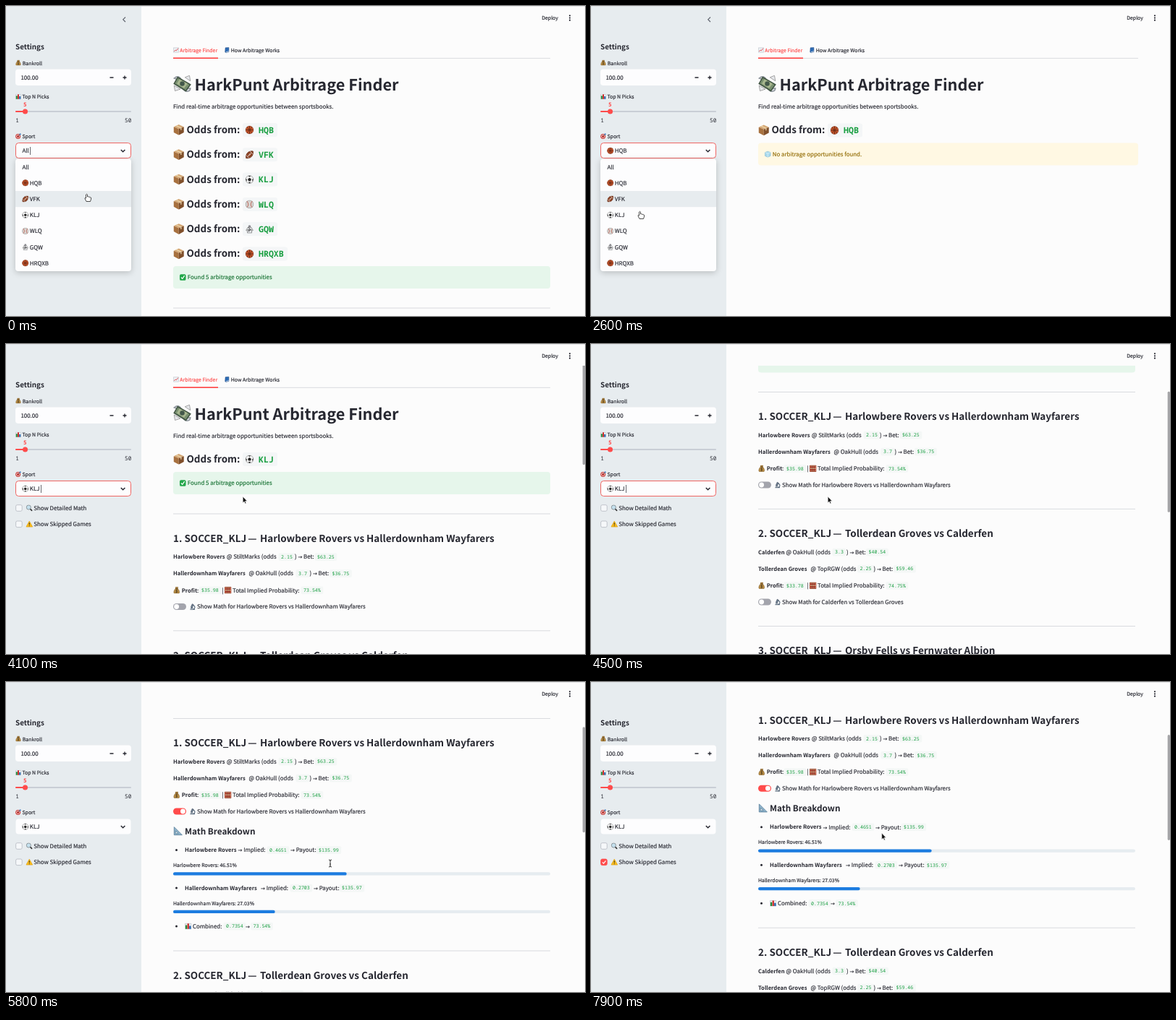
An HTML page that plays this animation: 800 by 429 pixels, repeating every 8 s.

```html
<!DOCTYPE html>
<html lang="en">
<head>
<meta charset="utf-8">
<title>Arbitrage Finder</title>
<style>
html, body { margin: 0; width: 100%; height: 100%; overflow: hidden; background: #fcfcfc }
svg { display: block }
text { font-family: "Noto Sans CJK JP", "Noto Sans CJK SC", "Noto Sans CJK", "Open Sans", sans-serif;
  fill: currentColor; stroke: currentColor; stroke-width: .16; white-space: pre; text-rendering: geometricPrecision }
.bold { font-weight: 700; stroke: none }
.arrow { font-family: "DejaVu Sans", sans-serif; font-size: 7px }
.mono { font-family: "Noto Sans Mono", "DejaVu Sans Mono", monospace; stroke: none }
</style>
</head>
<body>
<svg id="stage" width="800" height="429" viewBox="0 0 800 429">
  <defs id="defs"></defs>
  <rect width="800" height="429" fill="#fcfcfc"/>
  <g id="main"></g>
  <g id="top"></g>
  <g id="side"></g>
  <g id="cursor"></g>
</svg>
<script>
const $ = id => document.getElementById(id);
const RED = '#ff4b4b', GREEN = '#1a9f42', INK = '#262730', BODY = 8.82, SMALL = 7.72, HEAD = 15.06;
const TEAMS = ['Harlowbere Rovers', 'Hallerdownham Wayfarers'];
const SPORTS = [['All'], ['HQB', 'basket'], ['VFK', 'rugby'], ['KLJ', 'soccer'], ['WLQ', 'base'], ['GQW', 'gi'], ['HRQXB', 'basket']];

// Icons on a 20 x 20 grid
const p = (d, fill, stroke = 'none', w = 1.2) => `<path d="${d}" fill="${fill}" stroke="${stroke}" stroke-width="${w}"/>`;
const disc = (x, y, r, fill, stroke = 'none') => `<circle cx="${x}" cy="${y}" r="${r}" fill="${fill}" stroke="${stroke}"/>`;
const sheet = p('M1 2H19V18H1Z', '#eef1f3', '#a9b4bf');
const icons = {
  bag: p('M7 1H14L12.500 5C18 8 20 19 16 19H4C0 19 2 8 7.500 5Z', '#b98d45', '#7d5b26') + p('M6 5H14', 'none', '#6b4a1c', 2) +
    p('M13 9C8 7 6 12 10 12.500S12 17 7 15.500M10 7V18', 'none', '#4d3b1b', 1.500),
  bars: sheet + p('M2 7H7V18H2Z', '#23893a') + p('M7.500 2H12.500V18H7.500Z', '#cf302e') + p('M13 9H18V18H13Z', '#2565b0'),
  target: disc(9, 11, 8.5, '#c9302c') + disc(9, 11, 6, '#eee') + disc(9, 11, 4, '#c9302c') + p('M9 11 16 4', 'none', '#333', 1.500) + p('M14 6V2L18 0V3H20L18 6Z', '#3d7fc4'),
  basket: disc(10, 10, 9, '#c9562b', '#7d3018') + p('M1 10H19M10 1V19M4 3C9 7 9 13 4 17M16 3C11 7 11 13 16 17', 'none', '#4c1f12'),
  rugby: p('M2 18C0 8 8 0 18 2C20 12 12 20 2 18Z', '#8f4527', '#5f2b18') + p('M6 14 14 6M8 10 10 12M10 8 12 10', 'none', '#fff', 1.300) + p('M2 11 9 18M11 2 18 9', 'none', '#eee'),
  soccer: disc(10, 10, 9, '#f4f4f4', '#777') + p('M10 6 14 9 12.500 13.500H7.500L6 9ZM7 1.500H13L10 4ZM1 8 4 10 3 15ZM19 8 16 10 17 15ZM7 16H13L10 19Z', '#222'),
  base: disc(10, 10, 9, '#d9d5d1', '#858585') + p('M4 3C8 8 8 13 4 17M16 3C12 8 12 13 16 17', 'none', '#b5483c', 1.500),
  gi: disc(10, 4, 3, '#8b8b91') + p('M6 6H14L18 13 15 14V19H5V14L2 13Z', '#e3e5e8', '#777') + p('M5 12H15M10 12 8 16M7 6 12 11', 'none', '#333', 1.600),
  rise: sheet + p('M3 15 8 10 11 12 17 4', 'none', '#dd2f38', 2),
  book: p('M4 2 16 1V16L6 19 3 17Z', '#2d6cb5', '#1b4379') + p('M6 17 16 14', 'none', '#f2f2f2', 2),
  cash: p('M1 4C6 0 9 4 9 7ZM11 16C14 20 19 19 19 15Z', '#d9dde2', '#8b9299') + p('M5 3 19 11 14 18 1 10Z', '#799070', '#3f5341') +
    p('M7 5 16 10 12 15 4 10Z', '#a8b78f') + disc(10, 10, 2.6, '#43584a') + p('M13 3 18 1 19 7ZM1 12 2 18 8 16Z', '#e7e9ec', '#999', .700),
  box: p('M1 5 10 1 19 5 10 9Z', '#d5a875') + p('M1 5 10 9V20L1 15Z', '#a8713f') + p('M19 5 10 9V20L19 15Z', '#80502b') + p('M5 3 14 7V11', 'none', '#ecd6ad', 1.600),
  check: '<rect x="1" y="1" width="18" height="18" rx="4" fill="#22a74a"/>' + p('M5 10 9 14 15 5', 'none', '#fff', 2.500),
  ice: p('M2 5 10 2 18 5V15L10 19 2 15Z', '#a9d9ec', '#79b4d0') + p('M2 5 10 8 18 5M10 8V19', 'none', '#ecfaff'),
  lens: p('M11 11 18 18', 'none', '#333', 3.500) + disc(8, 8, 6.5, '#c4e0ee', '#444'),
  warn: p('M10 1 19.500 18H.500Z', '#fbbd1c', '#d79b0d') + p('M10 6V12M10 14V16', 'none', '#222', 2),
  scope: p('M9 2 13 4 9 13 5 11Z', '#6d7d90', '#39485a') + p('M12 6C19 9 18 16 12 17M3 18H17M4 14H11', 'none', '#43566b', 2.200),
  abacus: p('M1 1H19V19H1Z', '#dda983', '#963c28', 2) + p('M2 6H18M2 14H18', 'none', '#b5382e', 4) + p('M7 2V18M13 2V18', 'none', '#5a2e20', 1.500),
  ruler: p('M2 1V18H19Z', '#8fb3cb', '#4f7893') + p('M5 9V15H11Z', '#fcfcfc', '#4f7893')
};
$('defs').innerHTML = Object.entries(icons).map(([id, body]) => `<symbol id="${id}" viewBox="0 0 20 20">${body}</symbol>`).join('');

// Drawing helpers; y is the middle of the capitals
const icon = (x, y, id, s = 9.5) => `<use href="#${id}" x="${x}" y="${y - s / 2}" width="${s}" height="${s}"/>`;
const rect = (x, y, w, h, fill, r = 0, more = '') => `<rect x="${x}" y="${y}" width="${w}" height="${h}" rx="${r}" fill="${fill}" ${more}/>`;
const text = (x, y, str, size = BODY, color = INK, bold = false) =>
  `<text x="${x}" y="${y + size * .33}" font-size="${size * .895}" color="${color}" class="${bold ? 'bold' : ''}">${str.replace('→', '<tspan class="arrow">→</tspan>')}</text>`;
const mono = (x, y, str, size = 6.61, color = GREEN, weight = 400) =>
  `<text class="mono" x="${x}" y="${y + size * .35}" font-size="${size}" font-weight="${weight}" color="${color}">${str}</text>`;
const code = (x, y, str) => rect(x - 3.5, y - 5.2, str.length * 3.97 + 7, 10.6, '#f4f7f6', 2) + mono(x, y, str);
const head = (x, y, str, size = HEAD) => text(x, y, str, size, INK, true);
const rule = (y, right = 752) => rect(231, y - .5, right - 231, 1, '#d9dbdf');

// Pairs of x and text: * bold, ` code, # icon
function row(y, ...parts) {
  let out = '';
  for (let i = 0; i < parts.length; i += 2) {
    const x = parts[i], s = parts[i + 1], rest = s.slice(1);
    out += s[0] == '*' ? text(x, y, rest, BODY * .965, INK, true) : s[0] == '`' ? code(x, y, rest)
      : s[0] == '#' ? icon(x, y, rest) : text(x, y, s);
  }
  return out;
}

const odds = (y, [name, id]) => icon(231, y, 'box', 15.5) + head(249.5, y, 'Odds from:') +
  rect(327, y - 9, 27 + name.length * 7, 19, '#f4f6f7', 3) + icon(330.5, y + .5, id, 12) + mono(349, y + .8, name, 11.6, GREEN, 600);

const notice = (y, id, str, bg, fg, right) => rect(231, y, right - 231, 31, bg, 4) + icon(239.5, y + 15.5, id, 9.5) + text(250.8, y + 15.5, str, BODY, fg);
const found = y => notice(y, 'check', 'Found 5 arbitrage opportunities', '#e6f6eb', '#177233', 752);

const banner = right => icon(231, 61, 'rise', 8) + text(240.3, 61, 'Arbitrage Finder', SMALL, RED) +
  icon(301.5, 61, 'book', 8) + text(310.8, 61, 'How Arbitrage Works', SMALL) +
  rule(72.3, right) + rect(231, 71.3, 62, 1.7, RED) +
  icon(231, 107.5, 'cash', 25) + head(260.5, 108.5, 'HarkPunt Arbitrage Finder', 24.25) +
  text(231, 139, 'Find real-time arbitrage opportunities between sportsbooks.');

const title = (y, n, match) => head(231, y, n + '. SOCCER_KLJ') + head(334.3, y, '—') + head(351, y, match);
const profit = (y, gain, total) => row(y, 231, '#bag', 242.8, '*Profit', 264, ':', 270, '`' + gain, 298.5, '|', 302, '#abacus',
  313, 'Total Implied Probability:', 411, '`' + total);
const toggle = (y, on, match) => rect(231, y - 4.5, 18, 9, on ? RED : '#a3a4ac', 4.5) + disc(on ? 244.4 : 235.6, y, 3.4, '#fff') +
  icon(253, y, 'scope') + text(264, y, 'Show Math for ' + match);
const bar = (y, share) => rect(231, y - 2.2, 521, 4.4, '#e6ecf0', 2.2) + rect(231, y - 2.2, 521 * share, 4.4, '#1c7ce0', 2.2);

const math = y => icon(231, y + 122, 'ruler', 13) + head(247, y + 122, 'Math Breakdown', 13.1) +
  [148, 200.5, 253.5].map(d => disc(235.5, y + d, 1.5, INK)).join('') +
  row(y + 148, 247, '*' + TEAMS[0], 320.5, '→ Implied:', 364, '`0.4651', 393, '→ Payout:', 432, '`$135.99') +
  text(231, y + 169, TEAMS[0] + ': 46.51%', SMALL) + bar(y + 180.9, .46) +
  row(y + 200.5, 247, '*' + TEAMS[1], 352, '→ Implied:', 396, '`0.2703', 425, '→ Payout:', 464, '`$135.97') +
  text(231, y + 222, TEAMS[1] + ': 27.03%', SMALL) + bar(y + 233.4, .27) +
  row(y + 253.5, 247, '#bars', 258, 'Combined:', 304, '`0.7354', 331, '→', 341.5, '`73.54%');

function results(on, open) {
  const y = 281, y2 = y + (open ? 321.7 : 162), y3 = y2 + 161.5, match = TEAMS.join(' vs ');
  return banner(752) + odds(171, SPORTS[3]) + found(189) + rule(247) +
    title(y, 1, match) +
    row(y + 25.5, 231, '*' + TEAMS[0], 305, '@ StiltMarks (odds', 380, '`2.15', 399, ') → Bet:', 430, '`$63.25') +
    row(y + 48.5, 231, '*' + TEAMS[1], 335.5, '@ OakHull (odds', 404, '`3.7', 419.5, ') → Bet:', 450.5, '`$36.75') +
    profit(y + 71.8, '$35.98', '73.54%') + toggle(y + 94.5, on, match) + (open ? math(y) : '') + rule(y2 - 34.2) +
    title(y2, 2, 'Tollerdean Groves vs Calderfen') +
    row(y2 + 25.5, 231, '*Calderfen', 269.5, '@ OakHull (odds', 337, '`3.3', 353, ') → Bet:', 383.5, '`$40.54') +
    row(y2 + 48.5, 231, '*Tollerdean Groves', 303.5, '@ TopRGW (odds', 371.5, '`2.25', 390.5, ') → Bet:', 421.5, '`$59.46') +
    profit(y2 + 71.8, '$33.78', '74.75%') + toggle(y2 + 94.5, false, 'Calderfen vs Tollerdean Groves') + rule(y2 + 128) +
    title(y3, 3, 'Orsby Fells vs Fernwater Albion');
}

const pages = {
  all: banner(752) + SPORTS.slice(1).map((s, i) => odds(171 + i * 34.3, s)).join('') + found(360) + rule(418),
  one: banner(756) + odds(171.5, SPORTS[1]) + notice(189.5, 'ice', 'No arbitrage opportunities found.', '#fff8e3', '#926c05', 756),
  off: results(false, false), on: results(true, false), open: results(true, true)
};

const checkbox = (y, on, id, label) => rect(13.6, y - 4.3, 8.6, 8.6, on ? RED : '#f5f7f9', 2, `stroke="${on ? RED : '#b4b8c0'}" stroke-width=".8"`) +
  (on ? p(`M15.700 ${y}l1.700 1.800 3-3.800`, 'none', '#fff') : '') + icon(27.5, y, id) + text(38.3, y, label);
const option = (y, [name, id]) => id ? icon(22, y, id) + text(32.8, y, name) : text(22.5, y, name);

function sidebar(s) {
  const pick = SPORTS[s.sport], caret = s.sport ? 48 : 33;
  let out = rect(0, 0, 187, 429, '#e7ecef') + (s.inside ? p('M165 15.500 161.700 18.700 165 22', 'none', '#5c606b', 1.100) : '') +
    head(13, 56.6, 'Settings', 11) +
    icon(13, 78.5, 'bag', 8) + text(22.8, 79, 'Bankroll', SMALL) + rect(13, 87.5, 160, 22.5, '#fdfdfe', 4) + text(20.5, 99, '100.00') +
    p('M143.500 99H148.500M161.500 99H166.500M164 96.500V101.500', 'none', INK, 1.300) +
    icon(13, 125.5, 'bars', 8) + text(22.5, 125.5, 'Top N Picks', SMALL) + mono(24, 136.5, '5', SMALL, RED, 600) +
    rect(13, 145, 160, 2, '#c9ced5', 1) + rect(13, 145, 13, 2, RED, 1) + disc(26.5, 146, 3.5, RED) +
    mono(13.2, 158.5, '1', SMALL, INK) + mono(164, 158.5, '50', SMALL, INK) +
    icon(13, 180, 'target', 8) + text(22.5, 180, 'Sport', SMALL) +
    rect(13.5, 189.5, 159, 21, '#fdfdfe', 4, s.focus ? 'stroke="#ee5552" stroke-width=".9"' : '') +
    option(200.3, pick) + (s.caret ? rect(caret, 195, .7, 11, INK) : '') + p('M158.800 199 161.600 201.800 164.400 199', 'none', INK, 1.500);
  if (!s.open) return out + checkbox(227, false, 'lens', 'Show Detailed Math') + checkbox(249.3, s.skipped, 'warn', 'Show Skipped Games');
  return out + rect(13, 211.5, 160, 155.5, '#fdfdfe', 4, 'style="filter:drop-shadow(0 2px 4px #0003)"') +
    (s.hover >= 0 ? rect(13, 211.6 + s.hover * 22.2, 160, 22.2, '#e7ecef') : '') +
    SPORTS.map((o, i) => option(222.6 + i * 22.2, o)).join('');
}

const cursors = {
  hand: p('M-2 5.500-4 1.500Q-4.500 0-2.500 1V-4Q-1.200-5.500-.500-4V-1Q1-2 1.500-.600 3-1.500 3.400 0 5-.500 4.600 2L3.500 5.500Z', '#fff', '#222', .800),
  beam: p('M-2-5Q0-5 0-3.500 0-5 2-5M0-4V4M-2 5Q0 5 0 3.500 0 5 2 5M-1 1H1', 'none', '#222', .900),
  arrow: p('M-.800-5V4L1.200 2 2.500 5 3.900 4.400 2.600 1.500H5.200Z', '#111', '#fff', .600)
};
const path = [[0, 113, 265, 'hand'], [300, 108, 246, 'hand'], [600, 130, 222, 'hand'], [1000, 172, 196, 'beam'], [1300, 172, 196, 'beam'],
  [1600, 150, 200, 'hand'], [1800, 120, 215, 'hand'], [2300, 80, 262, 'hand'], [2600, 69, 289, 'hand'], [2700, 66, 302, 'hand'],
  [2900, 66, 292, 'hand'], [3100, 66, 292, 'arrow'], [3600, 328, 216, 'arrow'], [4600, 328, 216, 'arrow'], [5000, 240, 197, 'hand'],
  [5300, 240, 197, 'arrow'], [5800, 448, 251, 'beam'], [6300, 448, 251, 'arrow'], [6900, 18, 251, 'hand'], [7200, 18, 251, 'arrow'],
  [7700, 402.5, 214, 'arrow'], [8000, 402.5, 214, 'arrow']];
const scrolls = [[0, 0], [3900, 0], [4100, 12], [4300, 110], [4500, 180.5], [5500, 180.5], [5700, 196.5], [5900, 196.5], [6200, 228.3], [8000, 228.3]];

function along(keys, t, k) {
  const i = Math.max(1, keys.findIndex(q => q[0] > t)), a = keys[i - 1], b = keys[i];
  return a[k] + (b[k] - a[k]) * Math.max(0, t - a[0]) / (b[0] - a[0]);
}

const shown = {};
function fill(id, html) {
  if (shown[id] != html) $(id).innerHTML = shown[id] = html;
}

function draw(now) {
  const t = Math.floor(now / 100) * 100 % 8000;
  const x = along(path, t, 1), y = along(path, t, 2), scroll = along(scrolls, t, 1);
  const hover = Math.floor((along(path, t - 100, 2) - 5 - 211.4) / 22.2);
  const opened = t >= 5500;
  fill('main', pages[t < 800 ? 'all' : t < 3300 ? 'one' : t < 5200 ? 'off' : opened ? 'open' : 'on']);
  $('main').setAttribute('transform', `translate(0 ${-scroll})`);
  const ratio = 429 / (opened ? 1262 : 1102);
  fill('top', (t >= 3600 ? rect(796.7, Math.max(0, scroll * ratio - 4.5), 3.3, 429 * ratio, '#a5a5a8', 1.6) : '') +
    rect(187, 0, 613, 30, '#fcfcfc') + text(740.3, 16.5, 'Deploy', SMALL) +
    [13.3, 16.5, 19.7].map(d => disc(779, d, 1.1, INK)).join(''));
  fill('side', sidebar({
    sport: t < 400 ? 0 : t < 3000 ? 1 : 3, open: t < 400 || t >= 1700 && t < 3000, hover, inside: x < 187,
    focus: t < 5200, caret: t < 400 || t >= 3500 && t < 5200, skipped: t >= 7100
  }) + rect(0, 0, 800, .8, '#dfe2e4'));
  fill('cursor', cursors[path.filter(q => q[0] <= t).pop()[3]]);
  $('cursor').setAttribute('transform', `translate(${x} ${y})`);
}

const start = performance.now();
(function loop() {
  draw(performance.now() - start);
  requestAnimationFrame(loop);
})();
</script>
</body>
</html>
```
